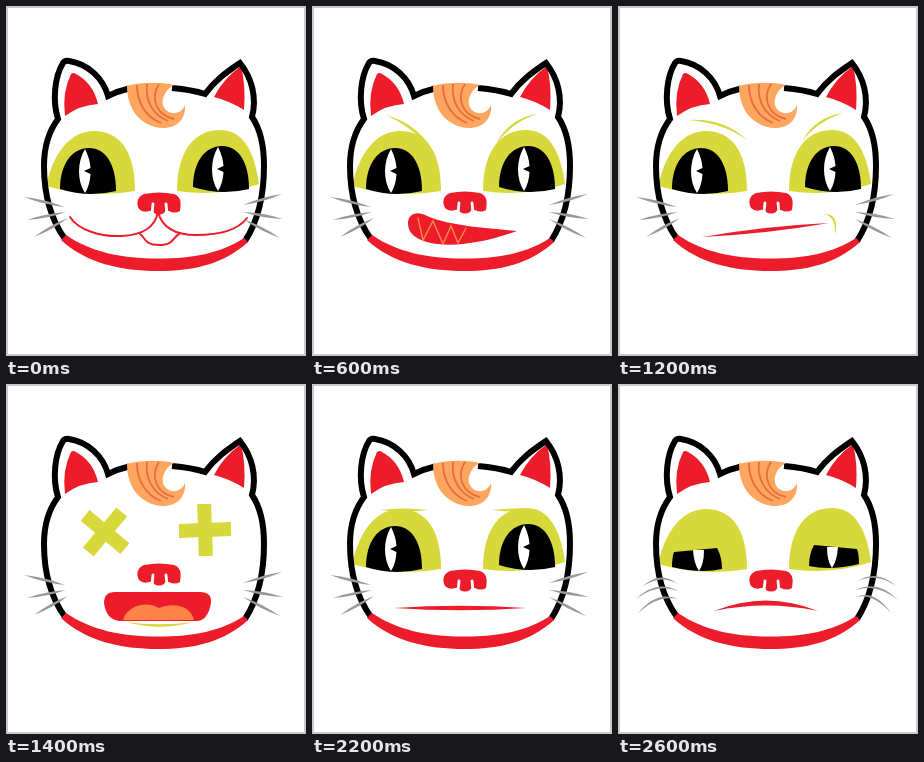
Write an HTML page that moves like this. It is 300 px wide and 350 px high and loops after 2.8 s.

```html
<!DOCTYPE html>
<html lang="en">
<head>
<meta charset="utf-8">
<title>Cat faces</title>
<style>
html, body { margin: 0; width: 100%; height: 100%; overflow: hidden; background: #fff; }
svg { display: block; width: 100%; height: 100%; }
</style>
</head>
<body>
<svg viewBox="0 0 300 350">
  <rect width="300" height="350" fill="#fff"/>
  <g id="eyes"></g>
  <g fill="#ec1c2a">
    <path d="M59 110Q56 86 65 68Q67 66 70 68Q87 77 92 98Q74 99 59 110Z"/>
    <path d="M235 60Q217 73 208 91Q224 95 238 104Q240 80 235 60Z"/>
  </g>
  <path fill="none" stroke="#000" stroke-width="6" stroke-miterlimit="8" d="M59 233C46 215 38 190 38 160C38 140 43 125 52 113C46 94 49 70 57 57Q59 54 63 55C82 58 97 72 102 90Q112 85 123 82.500M166 82C178 83 190 85 199 88C209 74 221 66 234 57C246 72 251 92 246 111C255 124 258 140 258 160C258 190 252 215 239 235"/>
  <path fill="#fda660" d="M121 80C135 76 155 76 168 79C158 84 153 97 160 104C167 110 176 107 179 99C180 113 171 122 157 122C136 121 121 105 121 80Z"/>
  <path fill="none" stroke="#ea6c3e" stroke-width="1.8" d="M131 79C131 97 140 111 155 117M141 78C139 95 147 109 162 115M153 78C144 92 150 109 168 113"/>
  <path fill="#ec1c2a" d="M60 229C85 246 115 252.500 152 252.500C188 252.500 215 247 238 232L242 236C218 258 188 265 152 265C115 265 80 257 55 234Z"/>
  <g id="face"></g>
  <rect x="1" y="1" width="298" height="348" fill="none" stroke="#c9c9c9" stroke-width="2"/>
</svg>
<script>
const RED = '#ec1c2a', GREEN = '#d7d83b', GREY = '#999', ORANGE = '#ff8247';
const fill = (d, color) => `<path d="${d}" fill="${color}"/>`;
const line = (d, color, width) =>
  `<path d="${d}" fill="none" stroke="${color}" stroke-width="${width}" stroke-linecap="round"/>`;

// Curved stroke around the control point (cx, cy), tapered at both ends.
function sliver(x1, y1, cx, cy, x2, y2, width, color) {
  const length = Math.hypot(x2 - x1, y2 - y1);
  const dx = (y1 - y2) / length * width, dy = (x2 - x1) / length * width;
  return fill(`M${x1} ${y1}Q${cx + dx} ${cy + dy} ${x2} ${y2}Q${cx - dx} ${cy - dy} ${x1} ${y1}Z`, color);
}

// Tapered stroke; bend moves its middle down.
const taper = (x1, y1, x2, y2, width, color, bend = 0) =>
  sliver(x1, y1, (x1 + x2) / 2, (y1 + y2) / 2 + bend * 2, x2, y2, width, color);

const domes = fill('M129 185C129 143 112 125 88 125C66 125 48 144 40 180Q85 193 129 185Z', GREEN) +
  fill('M171 185C171 144 189 124 214 124C236 124 248 143 253 178Q215 191 171 185Z', GREEN);

const pupil = (x, y) => `<g transform="translate(${x} ${y})">` +
  fill('M-28 18C-28 -7 -16 -23 1 -23C18 -23 28 -6 28 20Q0 27 -28 18Z', '#000') +
  fill('M-3 -22Q2 -12 2.500 -3L-4 0L2.500 3Q2 14 -3 22C-11 10 -11 -9 -3 -22Z', '#fff') + '</g>';

const sleepyPupil = (x, y, flip) => `<g transform="translate(${x} ${y}) scale(${flip} 1)">` +
  fill('M-28 18Q-28 8 -26 3L17 -1Q22 8 22 20Q0 25 -28 18Z', '#000') +
  fill('M-7 1H4Q4 15 -1 22Q-6 15 -7 1Z', '#fff') + '</g>';

const cross = (x, y, angle) => `<g transform="translate(${x} ${y}) rotate(${angle})">` +
  fill('M-7 -26H7V-7H26V7H7V26H-7V7H-26V-7H-7Z', GREEN) + '</g>';

const eyes = {
  open: domes + pupil(82, 165) + pupil(215, 163),
  sleepy: domes + sleepyPupil(82, 165, 1) + sleepyPupil(213, 162, -1),
  dead: cross(99, 148, 40) + cross(199, 146, -2),
  dizzy: cross(99, 148, 0) + cross(199, 146, 42)
};

const brows = {
  none: '',
  angry: sliver(74, 109, 109, 122, 125, 153, 3, GREEN) + sliver(184, 138, 199, 114, 225, 108, 2.5, GREEN),
  wry: sliver(70, 114, 105, 114, 129, 134, 2.5, GREEN) + sliver(184, 135, 199, 113, 225, 107, 2.5, GREEN),
  worried: sliver(53, 124, 104, 115, 124, 146, 3.5, GREEN) + sliver(177, 150, 193, 120, 240, 117, 3.5, GREEN),
  flat: taper(68, 126, 116, 126, 3, GREEN) + taper(180, 126, 229, 126, 3, GREEN)
};

const nose = y => `<g transform="translate(153 ${y})">` +
  fill('M-15 0Q0 -3 15 0C23 3 22 10 21 17Q16 20 10 17Q6 16 5 19Q0 22 -5 19Q-6 16 -10 17Q-16 19 -20 15C-23 9 -22 3 -15 0Z', RED) +
  line('M-6 10L-7 20M7 10L8 20', '#fff', 2.8) + '</g>';

const tongueOut = shift =>
  fill('M98 214Q150 224 206 214Q199 241 153 241Q107 241 98 214Z', RED) +
  fill(`M134 229Q152 222 172 229L${171 + shift} 257C${170 + shift} 275 ${137 + shift} 275 ${136 + shift} 257Z`, ORANGE) +
  line(`M153 231L${153 + shift} 256`, RED, 1.5);

const mouths = {
  smile: line('M64 211C72 224 95 231 115 230C138 229 149 221 152 206C156 221 168 229 190 229C215 229 232 224 241 212', RED, 2) +
    line('M134 228C139 231 138 239 153 239C168 239 167 231 173 228', RED, 2),
  grin: fill('M96 217C96 208 105 204 115 210C138 220 175 222 205 225C180 234 150 241 125 238C105 235 96 228 96 217Z', RED) +
    line('M106 212L111 234L121 215L131 238L139 220L146 237L154 222', ORANGE, 1.5),
  smirk: taper(84, 231, 211, 217, 4, RED) + sliver(205, 208, 220, 208, 217, 229, 2.5, GREEN),
  gape: fill('M109 208H194Q206 208 205 219Q202 237 190 237H113Q100 235 98 219Q98 208 109 208Z', RED) +
    fill('M117 236C121 222 140 216 153 224C168 218 185 222 188 236Z', ORANGE) +
    taper(120, 238, 187, 238, 2.5, GREEN, 3.5),
  wavy: fill('M91 231C95 210 114 207 126 221C137 237 160 237 167 224C178 208 208 209 213 232C205 215 182 213 171 227C162 242 133 242 122 225C112 211 98 214 91 231Z', RED),
  flat: taper(82, 224, 214, 224, 4.5, RED),
  frown: taper(96, 227, 200, 227, 5, RED, -8),
  tongueLeft: tongueOut(-4),
  tongueRight: tongueOut(4)
};

const whiskerEnds = [
  [18, 191, 59, 201], [21, 214, 60, 206], [28, 231, 62, 212],
  [276, 188, 237, 199], [277, 213, 237, 206], [274, 232, 237, 213]
];
const droopEnds = [
  [24, 203, 60, 200], [18, 215, 60, 207], [20, 229, 60, 215],
  [278, 202, 238, 198], [280, 216, 238, 206], [273, 229, 238, 213]
];
const zigzag = 'M11 184L21 208L25 178L39 204L43 191L57 206M11 226L23 238L31 215L43 229L45 216L60 227';
const whiskers = {
  straight: whiskerEnds.map(w => taper(...w, 2.8, GREY)).join(''),
  raised: whiskerEnds.map(w => taper(...w, 2.8, GREY, 4)).join(''),
  droop: droopEnds.map(w => taper(...w, 2, GREY, -7)).join(''),
  zigzag: line(zigzag, GREY, 1.6) +
    `<g transform="matrix(-1 0 0 1 304 0)">${line(zigzag, GREY, 1.6)}</g>`
};

// eyes, brows, nose height, mouth, whiskers
const poses = [
  ['open', 'none', 188, 'smile', 'straight'],
  ['open', 'none', 188, 'smile', 'raised'],
  ['open', 'angry', 187, 'smirk', 'straight'],
  ['open', 'angry', 187, 'grin', 'straight'],
  ['open', 'none', 187, 'tongueLeft', 'raised'],
  ['open', 'none', 187, 'tongueRight', 'droop'],
  ['open', 'wry', 187, 'smirk', 'straight'],
  ['dead', 'none', 181, 'gape', 'straight'],
  ['dizzy', 'none', 181, 'gape', 'straight'],
  ['open', 'worried', 187, 'wavy', 'zigzag'],
  ['open', 'worried', 187, 'frown', 'droop'],
  ['open', 'flat', 187, 'flat', 'straight'],
  ['sleepy', 'none', 187, 'flat', 'straight'],
  ['sleepy', 'none', 187, 'frown', 'droop']
];
const HOLD = 200;
const eyeLayer = document.getElementById('eyes'), faceLayer = document.getElementById('face');
let shown = -1;

function draw() {
  const index = Math.floor(performance.now() / HOLD) % poses.length;
  if (index !== shown) {
    const [eye, brow, noseY, mouth, whisker] = poses[index];
    eyeLayer.innerHTML = eyes[eye] + brows[brow];
    faceLayer.innerHTML = mouths[mouth] + nose(noseY) + whiskers[whisker];
    shown = index;
  }
  requestAnimationFrame(draw);
}
draw();
</script>
</body>
</html>
```
